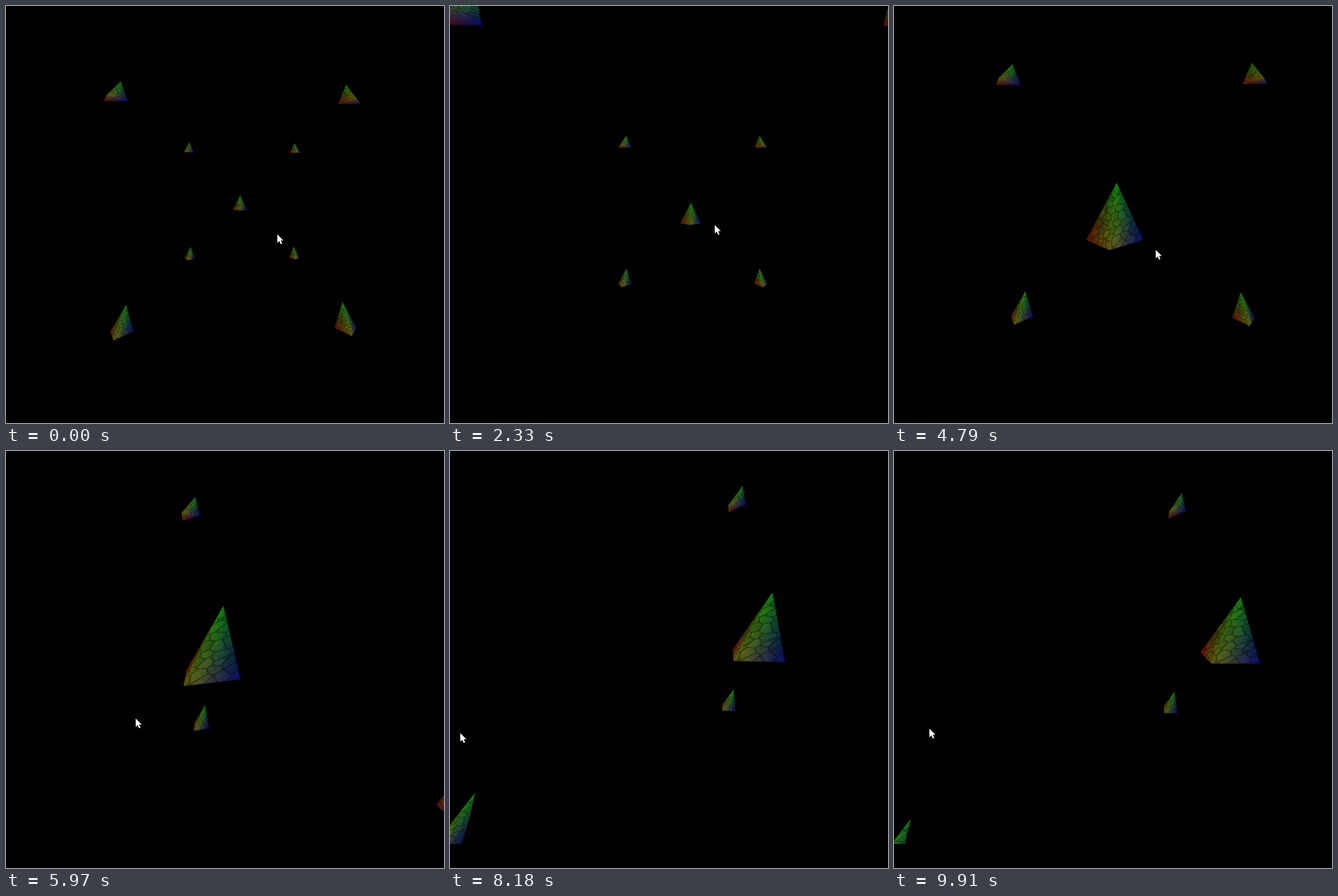
Animation of 594x566 px, one loop 10 s. Source, as an HTML page with a canvas:

```html
<!DOCTYPE html>
<html lang="en">
<head>
<meta charset="utf-8">
<title>Pyramids</title>
<style>
html, body { margin: 0; width: 100%; height: 100%; overflow: hidden; background: #000; }
canvas { display: block; }
</style>
</head>
<body>
<canvas id="stage" width="594" height="566"></canvas>
<script>
const ctx = document.getElementById('stage').getContext('2d');
const LOOP = 10000;
const VIEW_H = 533, FOCAL = 266.5, CX = 336, CY = 266.5, NEAR = 0.08;

// Pointer path: time, x, y. The pointer steers the view.
const POINTER = [
  [0, 368, 310], [1450, 342, 299], [3520, 382, 295], [4120, 387, 299], [4790, 355, 331],
  [5180, 309, 351], [5970, 176, 363], [7750, 4, 391], [8180, 14, 383], [9300, 20, 383], [9910, 48, 377]
];
// Walk: time, x, z
const WALK = [
  [0, .12, 2.79], [1450, .055, 2.39], [3520, .075, 1.36], [4790, .1, .74],
  [5970, .367, .506], [8180, .37, .603], [9910, .269, .72]
];

// Pyramid of unit size, measured from its apex
const SIZE = .1;
const VERTS = [
  { p: [-1, -2, .68], rgb: [118, 14, 5], uv: [0, 1] },
  { p: [0, -2, 1.75], rgb: [120, 116, 18], uv: [.5, 1] },
  { p: [1, -2, .68], rgb: [10, 12, 132], uv: [1, 1] },
  { p: [0, 0, 0], rgb: [16, 140, 14], uv: [.5, 0] }
];
const FACES = [[0, 1, 3], [1, 2, 3], [0, 2, 1], [0, 3, 2]];

// One in the middle, one at each corner of a cube
const CENTERS = [[0, 0, 0]];
for (const x of [-1, 1]) for (const y of [-1, 1]) for (const z of [-1, 1]) CENTERS.push([x, y, z]);

const TEX = 256;
const stone = makeStone(9);

function random(seed) {
  return () => (seed = (seed * 16807) % 2147483647) / 2147483647;
}

// Cracked stone: wrapped irregular cells with dark joints
function makeStone(n) {
  const rnd = random(4711);
  const cells = Array.from({ length: n * n }, (_, i) => ({
    x: (i % n + rnd()) * TEX / n,
    y: (Math.floor(i / n) + rnd()) * TEX / n,
    tone: .7 + .2 * rnd()
  }));
  const wrap = d => Math.min(Math.abs(d), TEX - Math.abs(d));
  const canvas = document.createElement('canvas');
  canvas.width = canvas.height = TEX;
  const c = canvas.getContext('2d');
  const img = c.createImageData(TEX, TEX);
  for (let y = 0, k = 0; y < TEX; y++) {
    for (let x = 0; x < TEX; x++, k += 4) {
      let first = 1e9, second = 1e9, tone = 1;
      for (const cell of cells) {
        const d = Math.hypot(wrap(x - cell.x), wrap(y - cell.y));
        if (d < first) { second = first; first = d; tone = cell.tone; }
        else if (d < second) second = d;
      }
      const joint = Math.min(1, .58 + (second - first) / 14);
      img.data.fill(255 * joint * (tone + .16 * (rnd() - .5)), k, k + 3);
      img.data[k + 3] = 255;
    }
  }
  c.putImageData(img, 0, 0);
  return ctx.createPattern(canvas, 'repeat');
}

function sample(path, t) {
  const i = path.findIndex(k => k[0] > t);
  if (i < 0) return path[path.length - 1].slice(1);
  const a = path[i - 1], b = path[i];
  const f = (t - a[0]) / (b[0] - a[0]);
  return a.map((v, j) => v + (b[j] - v) * f).slice(1);
}

function projector([px, py], [camX, camZ]) {
  const yaw = .00262 * (358 - px), pitch = .0026 * (py - 296);
  const lift = .18 * pitch - .01;
  const sy = Math.sin(yaw), cy = Math.cos(yaw);
  const sp = Math.sin(pitch), cp = Math.cos(pitch);
  return (x, y, z) => {
    const dx = x - camX, dz = z - camZ, h = y + lift;
    const side = dx * cy - dz * sy;
    const ahead = -dx * sy - dz * cy;
    const depth = ahead * cp - h * sp;
    const up = h * cp + ahead * sp;
    return { x: CX + FOCAL * side / depth, y: CY - FOCAL * up / depth, depth };
  };
}

const cross = (a, b, c) => (b.x - a.x) * (c.y - a.y) - (b.y - a.y) * (c.x - a.x);

// Colour of vertex a, fading to black at the edge b-c
function fade(a, b, c, rgb) {
  const ex = c.x - b.x, ey = c.y - b.y;
  const k = ((a.x - b.x) * ex + (a.y - b.y) * ey) / (ex * ex + ey * ey);
  const g = ctx.createLinearGradient(a.x, a.y, b.x + ex * k, b.y + ey * k);
  g.addColorStop(0, `rgb(${rgb})`);
  g.addColorStop(1, '#000');
  return g;
}

function fillTexture([p, q, r], uvs) {
  const [[u0, v0], [u1, v1], [u2, v2]] = uvs.map(([u, v]) => [u * TEX, v * TEX]);
  const du1 = u1 - u0, dv1 = v1 - v0, du2 = u2 - u0, dv2 = v2 - v0;
  const det = du1 * dv2 - du2 * dv1;
  if (!det) {
    ctx.fillStyle = '#b4b4b4';
    ctx.fill();
    return;
  }
  const along = (d1, d2) => [(d1 * dv2 - d2 * dv1) / det, (d2 * du1 - d1 * du2) / det];
  const [a, c] = along(q.x - p.x, r.x - p.x);
  const [b, d] = along(q.y - p.y, r.y - p.y);
  ctx.save();
  ctx.transform(a, b, c, d, p.x - a * u0 - c * v0, p.y - b * u0 - d * v0);
  ctx.fillStyle = stone;
  ctx.fill();
  ctx.restore();
}

function drawFace(face, pts) {
  const tri = face.map(i => pts[i]);
  if (cross(...tri) > -.3) return;
  ctx.beginPath();
  tri.forEach(p => ctx.lineTo(p.x, p.y));
  ctx.closePath();
  ctx.globalCompositeOperation = 'lighter';
  face.forEach((v, i) => {
    ctx.fillStyle = fade(tri[i], tri[(i + 1) % 3], tri[(i + 2) % 3], VERTS[v].rgb);
    ctx.fill();
  });
  ctx.globalCompositeOperation = 'multiply';
  fillTexture(tri, face.map(v => VERTS[v].uv));
}

function drawPyramid(center, project) {
  const pts = VERTS.map(({ p }) => project(...center.map((c, i) => c + SIZE * p[i])));
  if (pts.some(p => p.depth < NEAR)) return;
  FACES.forEach(face => drawFace(face, pts));
}

const arrow = new Path2D('M0 0V11.5L2.7 9L4.6 13.3L6.5 12.5L4.7 8.3H8.2Z');

function drawPointer([x, y]) {
  ctx.save();
  ctx.translate(x, y);
  ctx.fillStyle = '#fff';
  ctx.fill(arrow);
  ctx.restore();
}

function render(t) {
  const pointer = sample(POINTER, t);
  const project = projector(pointer, sample(WALK, t));
  ctx.fillStyle = '#000';
  ctx.fillRect(0, 0, 594, 566);
  ctx.save();
  ctx.beginPath();
  ctx.rect(0, 0, 594, VIEW_H);
  ctx.clip();
  CENTERS.forEach(c => drawPyramid(c, project));
  ctx.restore();
  drawPointer(pointer);
}

const start = performance.now();
function tick() {
  render((performance.now() - start) % LOOP);
  requestAnimationFrame(tick);
}
tick();
</script>
</body>
</html>
```
